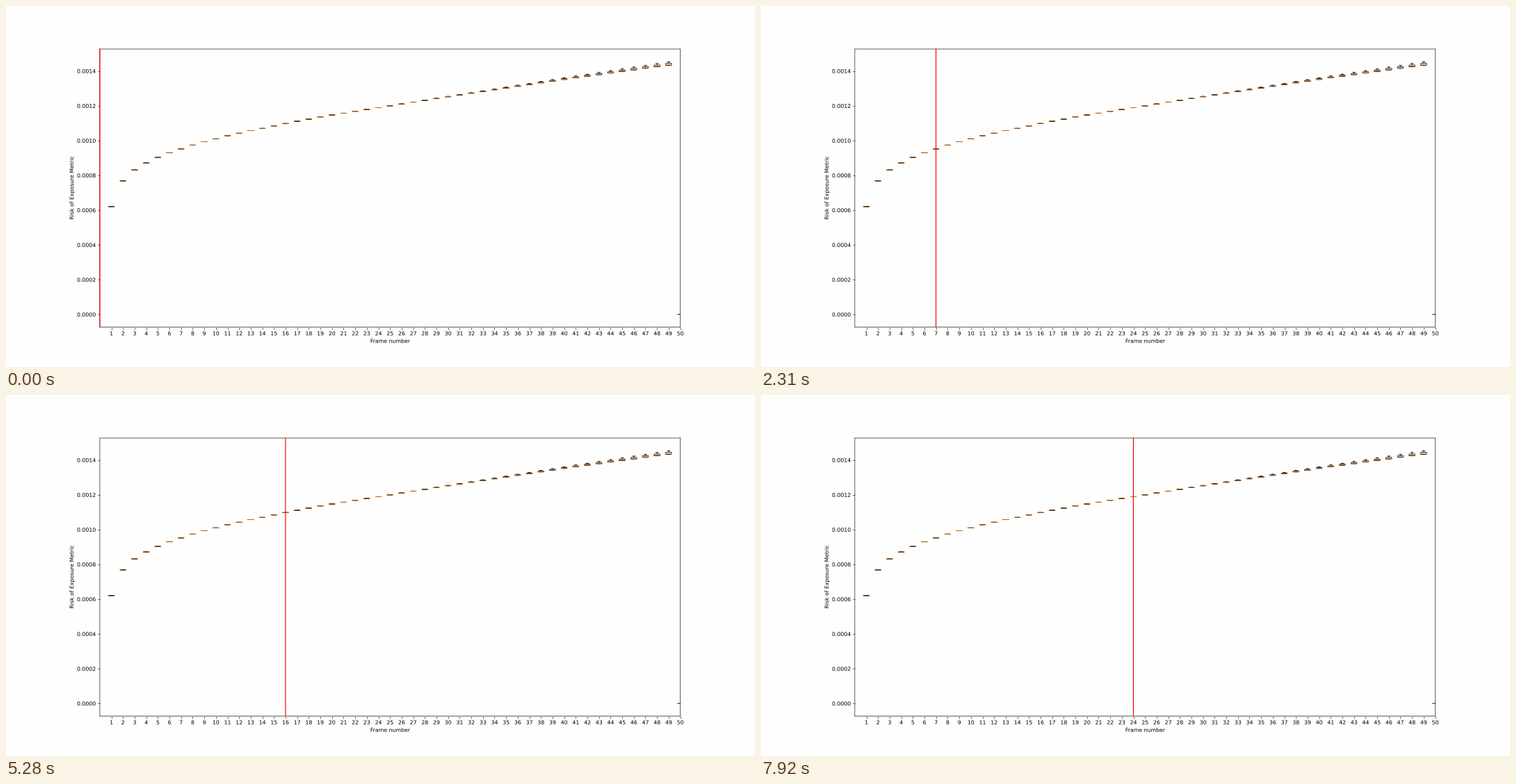
Animation, 1077 px wide and 520 px high, one loop 8000 ms. Source, as a matplotlib script:

```python
import matplotlib.pyplot as plt
import numpy as np
from matplotlib.animation import FuncAnimation
from matplotlib.collections import LineCollection
from matplotlib.patheffects import Normal

WIDTH, HEIGHT = 1077, 520
LOOP_MS, TICK_MS, STEP_MS = 8000, 40, 330
PAPER = "#fefefe"
ORANGE = "#ff7f0e"

# The chart is laid out on a finer grid and shown scaled down.
GRID_W, GRID_H = 1920, 927
GRID_STEP = 29.76
DPI = 100 * WIDTH / GRID_W

plt.rcParams.update({
    "font.family": "DejaVu Sans",
    "font.size": 10,
    "text.hinting": "none",
    "path.snap": False,
    "xtick.major.pad": 3.9,
    "ytick.major.pad": 3.9,
})


def medians():
    """Median risk per position, in millionths."""
    early = [620, 768, 831, 871, 903, 930, 952, 974, 993, 1010,
             1028, 1042, 1057, 1070, 1084, 1098, 1111, 1123, 1136, 1147]
    late = np.interp(np.arange(21, 50), [20, 30, 40, 49],
                     [1147, 1252, 1353, 1437])
    return [*early, *late, 0]


def box_lines(n, mid):
    """Black segments and the median segment of one box plot."""
    grow = max(0, (n - 20) / 29) ** 1.8 if n < 50 else 0
    low, high, top = mid - 3.5 * grow, mid + 7 * grow, mid + 16.5 * grow
    left, right = n - 0.25, n + 0.25
    box = [(left, low), (right, low), (right, high), (left, high), (left, low)]
    whisker = [(n, high), (n, top)]
    caps = [[(n - 0.125, y), (n + 0.125, y)] for y in (low, top)]
    return [box, whisker, *caps], [(left, mid), (right, mid)]


def add_lines(ax, segments, color, zorder):
    scaled = [np.array(s) * (1, 1e-6) for s in segments]
    ax.add_collection(LineCollection(
        scaled, colors=color, linewidths=1, capstyle="projecting",
        zorder=zorder), autolim=False)


fig, ax = plt.subplots(
    figsize=((WIDTH + 1e-6) / DPI, (HEIGHT + 1e-6) / DPI),
    dpi=DPI, facecolor=PAPER)
fig.subplots_adjust(left=240.5 / GRID_W, right=1728.5 / GRID_W,
                    bottom=102.5 / GRID_H, top=816.5 / GRID_H)
ax.set_facecolor(PAPER)
ax.set_xlim(0, 50)
ax.set_ylim(-72.7e-6, 1526.3e-6)
ax.set_xticks(range(1, 51))
ax.set_xlabel("Frame number")
ax.set_ylabel("Risk of Exposure Metric")

# Text drawn as outlines keeps its place between pixels.
for label in [ax.xaxis.label, ax.yaxis.label,
              *ax.get_xticklabels(), *ax.get_yticklabels()]:
    label.set_path_effects([Normal()])

outlines, centers = [], []
for n, mid in enumerate(medians(), start=1):
    black, center = box_lines(n, mid)
    outlines += black
    centers.append(center)
add_lines(ax, outlines, "black", 2)
add_lines(ax, centers, ORANGE, 2.1)

cursor = ax.axvline(0, color="red", linewidth=1.5, zorder=5, clip_on=False)


def update(frame):
    # A step that falls inside a tick is shown from that tick on.
    n = (frame * TICK_MS + TICK_MS - 10) // STEP_MS
    x = np.floor(GRID_STEP * n + 0.5) / GRID_STEP
    cursor.set_xdata([x, x])
    return [cursor]


anim = FuncAnimation(fig, update, frames=LOOP_MS // TICK_MS,
                     init_func=lambda: update(0), interval=TICK_MS,
                     repeat=True, repeat_delay=0)
plt.show()
```
